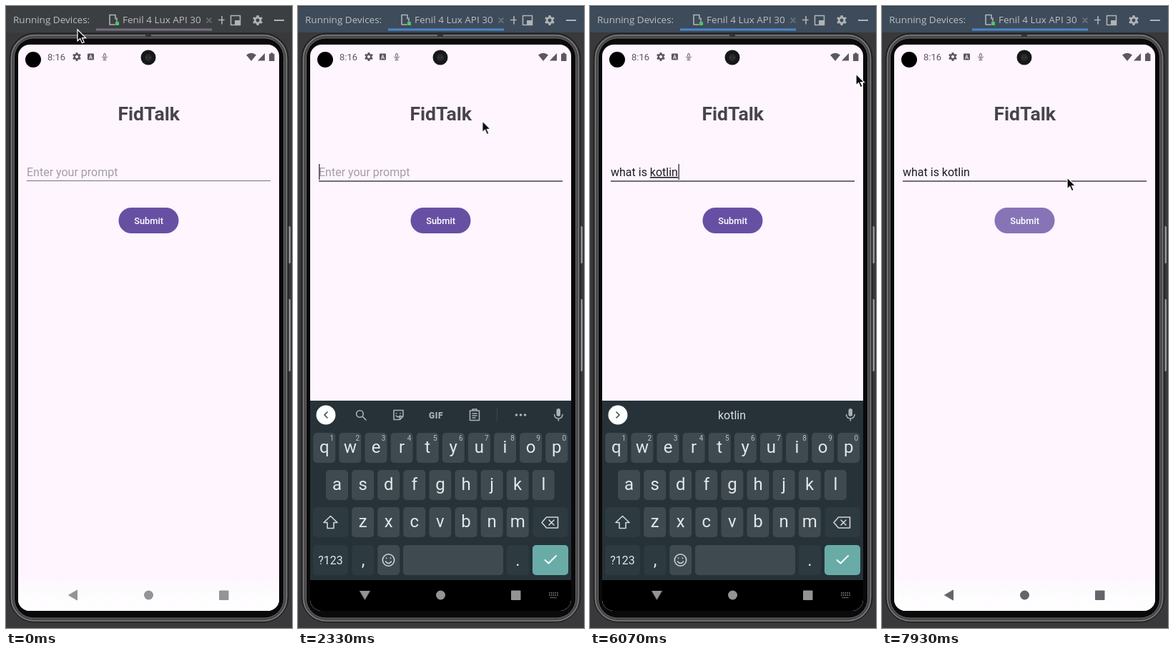
Write an HTML page that moves like this. It is 400 px wide and 870 px high and loops after 8 s.

```html
<!DOCTYPE html>
<html lang="en">
<head>
<meta charset="utf-8">
<title>Prompt app on a phone emulator</title>
<style>
  html, body { margin: 0; width: 100%; height: 100%; overflow: hidden; background: #3a3a3c; }
  svg { display: block; width: 400px; height: 870px; font-family: Roboto, sans-serif; }
  .mid { text-anchor: middle; }
  .ide { font: 13.5px "Open Sans", sans-serif; fill: #bbbdc0; }
  .line { fill: none; stroke: currentColor; stroke-width: 1.6; stroke-linecap: round; stroke-linejoin: round; }

  /* One percent of the loop is 80 ms. */
  .anim { animation: 8s linear infinite; }
  .hard { animation-timing-function: step-end; }

  #pointer { animation-name: pointer; }
  @keyframes pointer {
    0%, .9% { transform: translate(100px, 33px); }
    7.5%, 22.5% { transform: translate(121px, 228px); }
    29.1% { transform: translate(256.5px, 161.5px); }
    32.5%, 75.9% { transform: translate(372px, 95px); }
    85.9%, 86.6% { transform: translate(91px, 825px); }
    88.4% { transform: translate(110px, 724px); }
    96.6%, 97.5% { transform: translate(233px, 304px); }
    99.1%, 100% { transform: translate(259px, 240px); }
  }

  #bar { animation-name: bar; }
  @keyframes bar { 0% { fill: #3c3f41; } 10.6%, 100% { fill: #3d4b5a; } }
  #tabLine { animation-name: tab-line; }
  @keyframes tab-line { 0% { fill: #746f80; } 10.6%, 100% { fill: #4a88c7; } }
  #fieldLine { animation-name: field-line; }
  @keyframes field-line {
    0% { height: 1px; fill: #77727b; }
    10.6%, 100% { height: 2px; fill: #736d78; }
  }

  #caret { animation-name: caret; }
  @keyframes caret {
    0%, 16.6%, 30%, 79.1%, 91.6%, 100% { opacity: 0; }
    10.6%, 23.1%, 36.6%, 85.4% { opacity: 1; }
  }

  #keyboard { animation-name: keyboard; }
  @keyframes keyboard {
    0%, 23.3% { transform: translateY(28px); opacity: 0; }
    26%, 88% { transform: none; opacity: 1; }
    90.9%, 100% { transform: translateY(28px); opacity: 0; }
  }

  #nav { animation-name: nav; }
  @keyframes nav {
    0%, 86.6% { color: #949396; }
    88%, 88.8% { color: #bebebe; }
    91%, 100% { color: #656468; }
  }
  #back { animation-name: back; }
  @keyframes back {
    0%, 23.3% { transform: rotate(0); }
    26%, 88.8% { transform: rotate(-90deg); }
    91.5%, 100% { transform: rotate(0); }
  }
  #switcher { animation-name: switcher; }
  @keyframes switcher { 0%, 87.5%, 100% { opacity: 0; } 17.4% { opacity: 1; } }
  #navRipple { animation-name: nav-ripple; }
  @keyframes nav-ripple { 0%, 86.4% { opacity: 0; } 87.3%, 88.4% { opacity: .2; } 92%, 100% { opacity: 0; } }
  #buttonRipple { animation-name: button-ripple; }
  @keyframes button-ripple { 0%, 97% { opacity: 0; } 99%, 100% { opacity: .21; } }
</style>
</head>
<body>
<svg viewBox="0 0 400 870">
  <defs>
    <clipPath id="screen"><rect x="17" y="54" width="365" height="792" rx="16"/></clipPath>
    <linearGradient id="fade" x2="0" y2="1">
      <stop stop-color="#fef5ff"/><stop offset=".35" stop-color="#fdfafd"/><stop offset="1" stop-color="#fff"/>
    </linearGradient>
    <path id="gear" fill-rule="evenodd" d="M-1.4-7H1.4L1.8-4.9 3.3-4.1 5.4-4.8 6.8-2.4 5.1-.9V.9L6.8 2.4 5.4 4.8 3.3 4.1 1.8 4.9 1.4 7H-1.4L-1.8 4.9-3.3 4.1-5.4 4.8-6.8 2.4-5.1.9V-.9L-6.8-2.4-5.4-4.8-3.3-4.1-1.8-4.9ZM0-2.4A2.4 2.4 0 1 0 .01-2.4Z"/>
  </defs>

  <!-- Emulator window -->
  <rect width="400" height="870" fill="#39393b"/>
  <rect id="bar" class="anim hard" width="400" height="37"/>
  <path d="M0 .5H400" stroke="#323436"/>
  <rect id="tabLine" class="anim hard" x="126" y="31.5" width="162" height="3"/>
  <text class="ide" x="10" y="24">Running Devices:</text>
  <text class="ide" x="163" y="24">Fenil 4 Lux API 30</text>
  <g color="#b0b3b6">
    <path class="line" d="M152 26H145V12.500H153V18M155 17V21"/>
    <rect x="153" y="22" width="5" height="5" fill="#4fc36b"/>
    <path class="line" stroke-width="1" d="M281 17 287 23M287 17 281 23" opacity=".45"/>
    <path class="line" d="M297.500 19.500H305M302 14.500V25"/>
    <path class="line" d="M314.500 13.500H327.500V26.500H314.500Z"/>
    <path fill="currentColor" d="M320 20H328V27H320Z"/>
    <use href="#gear" transform="translate(352 20)" fill="currentColor"/>
    <path d="M375 20H389" stroke="currentColor" stroke-width="2"/>
  </g>

  <!-- Phone body -->
  <g fill="#98989a">
    <rect x="393" y="308" width="5" height="52" rx="1.500"/>
    <rect x="393" y="410" width="5" height="101" rx="1.500"/>
  </g>
  <rect x="5.500" y="38.500" width="389" height="823" rx="35" fill="#464648" stroke="#222224" stroke-width="2"/>
  <rect x="7.500" y="41" width="385" height="819" rx="32" fill="none" stroke="#7c7c7e" stroke-width="1.500"/>
  <rect x="11.500" y="45" width="377" height="811" rx="27" fill="#0a0a0b" stroke="#666668"/>
  <rect x="195" y="40" width="8" height="3" fill="#333"/>

  <g clip-path="url(#screen)">
    <rect x="17" y="54" width="365" height="792" fill="#fef5ff"/>
    <rect x="17" y="797" width="365" height="50" fill="url(#fade)"/>

    <!-- App -->
    <text class="mid" x="199.700" y="160" font-size="26.600" font-weight="700" fill="#48444b">FidTalk</text>
    <text id="hint" x="29" y="238" font-size="16" fill="#a49da6">Enter your prompt</text>
    <text id="entry" x="29" y="238" font-size="16" fill="#1d1b20"><tspan></tspan><tspan text-decoration="underline"></tspan></text>
    <rect id="caret" class="anim hard" x="29" y="221" width="1.500" height="22" fill="#4a454e"/>
    <rect id="fieldLine" class="anim hard" x="29" y="244" width="341"/>
    <rect x="157.500" y="282" width="84" height="36" rx="18" fill="#6750a4"/>
    <rect id="buttonRipple" class="anim" x="157.500" y="282" width="84" height="36" rx="18" fill="#fff"/>
    <text class="mid" x="199.600" y="305" font-size="12.800" font-weight="500" fill="#fff">Submit</text>

    <!-- Status bar -->
    <g fill="#5c585f" color="#5c585f">
      <text x="58" y="76" font-size="13">8:16</text>
      <use href="#gear" transform="translate(99 71) scale(.85)"/>
      <rect x="114" y="66.500" width="9" height="9" rx="1"/>
      <path d="M116.500 74 118.500 68.500 120.500 74M117.300 72.200H119.700" fill="none" stroke="#fef5ff"/>
      <g class="line" style="stroke-width: 1">
        <rect x="136.700" y="66.500" width="2.600" height="5.500" rx="1.300"/>
        <path d="M134.500 71Q138 77 141.500 71M136 75.500H140"/>
      </g>
      <path d="M336 68.500Q343 63 350 68.500L343 77Z"/>
      <path d="M352 76.500H362V66ZM368 67H370V65.500H373.500V67H375.500V77H368Z"/>
    </g>
    <circle cx="38" cy="75" r="11"/>
    <circle cx="199" cy="72" r="10.500" fill="#161719"/>
    <circle cx="199" cy="72" r="5" fill="#29292c"/>
    <path d="M196 72H197.500M200.500 72H202" stroke="#555"/>

    <!-- Keyboard -->
    <g id="keyboard" class="anim">
      <rect x="17" y="552" width="365" height="252" fill="#263238"/>
      <rect x="17" y="803" width="365" height="50"/>
      <circle cx="39" cy="572" r="13.500" fill="#fff"/>
      <path id="chevron" class="line" color="#37474f"/>
      <g color="#aab2b6" fill="#aab2b6">
        <g id="tools">
          <g class="line">
            <circle cx="86.500" cy="570.500" r="4.800"/><path d="M90.500 574.500 95 579"/>
            <path d="M134 565.500H147V574L142.500 578.500H134ZM147 574H142.500V578.500M137.500 569.500V570M143 569.500V570M137 573Q140 576.500 143 573"/>
            <path d="M240.500 566H253.500V579.500H240.500ZM244 566V564H250V566M244 570H250M244 573H250M244 576H248"/>
          </g>
          <text class="mid" x="193" y="576.500" font-size="12" font-weight="900" letter-spacing=".6">GIF</text>
          <path d="M278.500 562V582" stroke="#37454b"/>
          <circle cx="305.500" cy="572" r="1.800"/><circle cx="311.500" cy="572" r="1.800"/><circle cx="317.500" cy="572" r="1.800"/>
        </g>
        <rect x="361.500" y="563" width="5.500" height="11" rx="2.700"/>
        <path class="line" d="M358.500 571.500Q359 577 364.300 577 369.500 577 370 571.500M364.300 577V580"/>
      </g>
      <g id="suggestions" class="mid" font-size="16" fill="#dce1e3">
        <path d="M145.500 562V583M252.500 562V583" stroke="#37454b"/>
        <text x="97.500" y="578"></text><text x="198.500" y="578"></text><text x="299" y="578"></text>
      </g>
      <g id="keys" class="mid" font-size="24" fill="#e2e7e9"></g>
      <g class="line" color="#cfd5d8">
        <path d="M45.500 713.500 36 722.500H41V730.500H50V722.500H55Z"/>
        <path d="M341 722.500 347.500 715H363.500V730H347.500ZM351 719 358 726M358 719 351 726"/>
        <circle cx="126.500" cy="775" r="8.200"/><path d="M123.500 772V772.500M129.500 772V772.500M122.500 777Q126.500 782 130.500 777"/>
        <path d="M345.500 775 350.500 779.500 361 769" color="#fff" stroke-width="2"/>
      </g>
    </g>

    <!-- Navigation bar -->
    <rect id="navRipple" class="anim" x="57" y="803" width="75" height="42" rx="21" fill="#aaa"/>
    <g id="nav" class="anim" fill="currentColor">
      <g transform="translate(93.500 824)"><path id="back" class="anim" d="M-6.800 0 6-7.500V7.500Z"/></g>
      <circle cx="199.500" cy="824" r="6.500"/>
      <rect x="298" y="817.500" width="13.500" height="13.500" rx="1"/>
      <path id="switcher" class="anim hard" fill="none" stroke="currentColor" stroke-width="1.500" stroke-dasharray="1.500 1.300" d="M351 821H364M351 824H364M353 827.500H362"/>
    </g>
  </g>

  <g id="pointer" class="anim"><path d="M0 0V16L3.700 12.600 6.400 18.800 9.200 17.600 6.500 11.600H11.500Z" fill="#0a0a0a" stroke="#fff" stroke-width="1.200"/></g>
</svg>

<script>
const $ = id => document.getElementById(id);
const LOOP = 8000, PITCH = 36.1;

function addKey(cx, y, width, label, { fill = '#3e4a50', size = 24, dy = 27.5, superscript } = {}) {
  const text = (x, ty, fontSize, value) => `<text x="${x}" y="${ty}" font-size="${fontSize}">${value}</text>`;
  $('keys').insertAdjacentHTML('beforeend',
    `<rect x="${cx - width / 2}" y="${y}" width="${width}" height="42" rx="5" fill="${fill}"/>` +
    text(cx, y + dy, size, label) +
    (superscript ? `<g opacity=".75">${text(cx + 10.5, y + 11, 10, superscript)}</g>` : ''));
}

[['qwertyuiop', 36.8, 597], ['asdfghjkl', 54.5, 649], ['zxcvbnm', 90.6, 701]].forEach(([row, left, y], r) =>
  [...row].forEach((letter, i) =>
    addKey(left + i * PITCH, y, 31, letter, { superscript: r ? '' : String((i + 1) % 10) })));

const dark = '#2d3a40';
addKey(45.5, 701, 49, '', { fill: dark });
addKey(353, 701, 49, '', { fill: dark });
addKey(45.5, 754, 49, '?123', { fill: dark, size: 16, dy: 27 });
addKey(91, 754, 31, ',', { fill: dark, dy: 29 });
addKey(126.7, 754, 31, '');
addKey(217, 754, 140, '');
addKey(307.5, 754, 31, '.', { fill: dark, dy: 29 });
addKey(353, 754, 50, '', { fill: '#69aca7' });

// Time, committed text, word being composed, suggestions (none shows the tools)
const typing = [
  [0, '', '', ''],
  [3330, 'w', '', ''],
  [3470, '', 'wh', 'why what who'],
  [3600, '', 'wha', 'whatever what whats'],
  [3730, '', 'what', 'whatever what whats'],
  [3870, 'what ', '', 'is are the'],
  [4000, 'what ', 'i', 'in I is'],
  [4070, 'what ', 'is', 'is it in'],
  [4130, 'what ', 'is', 'isn is it'],
  [4200, 'what is ', '', 'isn is it'],
  [4300, 'what is ', '', 'it the your'],
  [4670, 'what is k', '', 'it the your'],
  [4740, 'what is ', 'k', 'know k keep'],
  [4870, 'what is ', 'ko', 'kind ko know'],
  [5070, 'what is ', 'kot', 'not kot lot'],
  [5270, 'what is ', 'kotl', 'kotlin kotl total'],
  [5470, 'what is ', 'kotli', 'kotlin kotli hotline'],
  [5600, 'what is ', 'kotlin', 'kotlin kotli hotline'],
  [5800, 'what is ', 'kotlin', 'kotlin'],
  [6930, 'what is kotlin', '', '']
];

const entry = $('entry');
const slots = $('suggestions').querySelectorAll('text');
let shown;

function show(state) {
  const [, done, word, list] = state;
  const words = list ? list.split(' ') : [];
  const [left, middle, right] = words.length === 1 ? ['', words[0], ''] : words;
  entry.children[0].textContent = done.replace(/ /g, '\u00a0');
  entry.children[1].textContent = word;
  $('hint').style.opacity = done || word ? 0 : 1;
  $('caret').setAttribute('x', 29 + (done || word ? entry.getComputedTextLength() + .5 : 0));
  $('tools').style.display = list ? 'none' : '';
  $('suggestions').style.display = list ? '' : 'none';
  $('suggestions').firstElementChild.style.opacity = words.length > 1 ? 1 : 0;
  [left, middle, right].forEach((value, i) => { slots[i].textContent = value || ''; });
  $('chevron').setAttribute('d', list ? 'M37 568 41 572 37 576' : 'M41 568 37 572 41 576');
}

let start;
function tick(now) {
  start ??= now;
  const t = (now - start) % LOOP;
  const state = typing.findLast(([time]) => time <= t);
  if (state !== shown) show(shown = state);
  requestAnimationFrame(tick);
}
requestAnimationFrame(tick);
</script>
</body>
</html>
```
